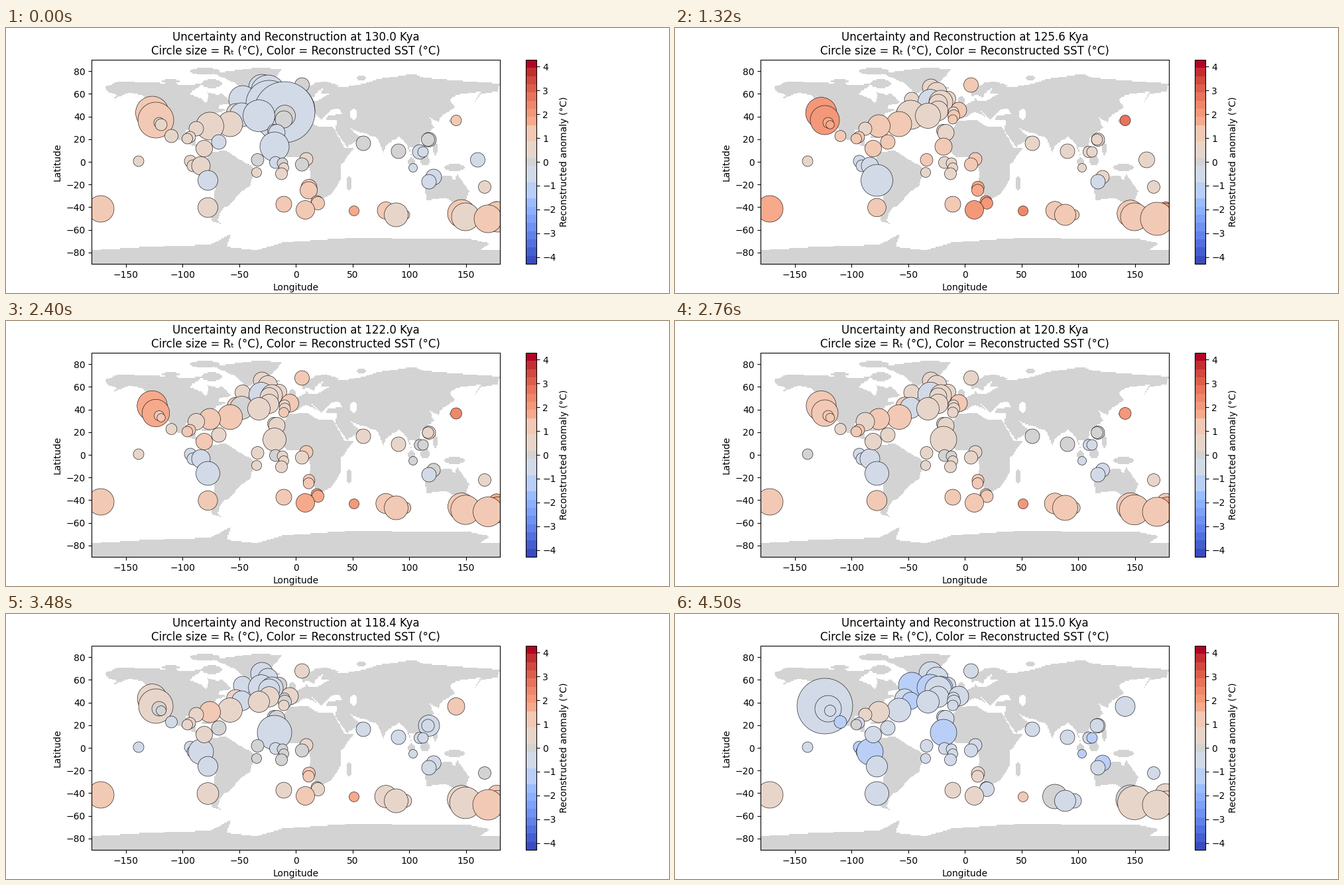
A matplotlib script that plays this animation: 1000x400 px, repeating every 4530 ms.

```python
import numpy as np
import matplotlib.pyplot as plt
from matplotlib.animation import FuncAnimation
from matplotlib.cm import ScalarMappable
from matplotlib.colors import ListedColormap, Normalize, to_rgb
from matplotlib.path import Path

plt.rcParams["font.family"] = "DejaVu Sans"
V_MAX = 4.29
PX_PER_DEG = 616 / 360

# Rough coastlines as (lon, lat) corners
canada = [(-168, 66), (-156, 71), (-128, 70), (-96, 68), (-82, 69), (-87, 65),
          (-94, 60), (-82, 55), (-79, 52), (-77, 58), (-78, 62), (-70, 59),
          (-65, 60), (-56, 52), (-66, 50), (-70, 47), (-124, 47), (-136, 59),
          (-147, 61), (-162, 55), (-158, 59), (-166, 62)]
usa_mexico = [(-124, 48), (-70, 48), (-60, 46), (-70, 43), (-76, 36), (-81, 31),
              (-80, 25), (-84, 30), (-97, 28), (-98, 22), (-95, 18.5), (-88, 21),
              (-88, 16), (-83, 15), (-77, 8), (-82, 8), (-88, 13), (-105, 20),
              (-113, 31), (-117, 33), (-124, 40)]
south_america = [(-77, 8), (-62, 10.5), (-51, 3), (-35, -6), (-41, -22), (-48, -26),
                 (-57, -37), (-65, -42), (-69, -51), (-66, -55), (-74, -52),
                 (-71, -19), (-81, -5), (-79, 2)]
europe_north = [(8, 53), (10, 57), (11, 54), (20, 54.5), (30, 60), (22, 60.5),
                (25, 65.5), (18, 61), (16, 56), (11, 59), (6, 58), (5, 62),
                (18, 70), (26, 71), (40, 67), (34, 66), (44, 66), (60, 69), (60, 53)]
europe_south = [(8, 54), (60, 54), (60, 25.5), (51, 28), (48, 30), (54, 24), (59, 22),
                (45, 13), (35, 28), (36, 36.5), (27, 37), (28, 41), (41, 42),
                (38, 47), (31, 46), (28, 42), (23, 37), (14, 45), (18, 40), (9, 44),
                (0, 39), (-9, 37), (-9, 43), (-1.5, 44), (-4, 48)]
asia = [(60, 69), (73, 73), (104, 77.5), (113, 74), (140, 72), (180, 69), (178, 62.5),
        (163, 59.5), (157, 51), (163, 62), (142, 59), (136, 55), (140, 48), (128, 40),
        (126, 35), (118, 39), (122, 30), (110, 21), (109, 12), (100, 13), (103, 2),
        (98, 15.5), (91, 22), (80, 15), (77.5, 8), (72, 21), (60, 25.5)]
africa = [(-6, 36), (10, 37), (20, 31), (33, 31), (43, 12), (51, 12), (40, -3),
          (40, -15), (32, -28), (20, -35), (12, -18), (13, -10), (9, 4), (-8, 4.5),
          (-17, 14), (-10, 30)]
australia = [(114, -22), (131, -12), (137, -12), (140, -17), (142.5, -11),
             (153, -26), (149, -38), (138, -35), (131, -31.5), (115, -34.5)]
greenland = [(-73, 78), (-32, 83.5), (-12, 81.5), (-22, 70), (-43, 60), (-54, 70)]
antarctica = [(-180, -90), (-180, -78), (-130, -75), (-75, -73), (-57, -63.5),
              (-61, -75), (-35, -78), (-10, -71), (50, -67), (155, -68.5),
              (171, -72), (163, -77.5), (180, -78), (180, -90)]
COASTS = (canada, usa_mexico, south_america, europe_north, europe_south, asia,
          africa, australia, greenland, antarctica)

# Islands as ellipses: lon, lat, half width, half height
ISLANDS = [(-74, 69, 9, 4), (-80, 80, 13, 3), (-110, 71, 8, 2), (-19, 65, 5, 1.4),
           (-3, 54, 3, 4), (47, -19, 2.3, 6), (102, 0, 3, 4), (114, 1, 4, 4.5),
           (140, -5, 9, 3), (138, 36, 3, 2.5), (172, -42, 3, 3), (123, 12, 2, 6),
           (-79, 22, 5, 1), (58, 74, 4, 2)]

# Anomaly curves (°C) at these steps
KEYS = [0, 20, 44, 68, 92, 116, 150]
north = [-.65, .3, .4, .4, .35, -.25, -.7]
subpolar = [-.5, 0, -.3, -.3, -.4, -.6, -.95]
middle = [.1, 1, 1.15, 1.05, .75, .3, -.4]
subtropic = [.65, 1.1, 1.2, 1.2, 1.05, .6, -.35]
gulf = [.6, .8, .8, .9, .7, .65, .4]
baja = [.5, .9, .9, .7, .4, -.4, -1]
west = [1, 1.8, 2, 1.9, 1.2, .3, -.5]
tropic = [.4, .5, .6, .5, .1, -.3, -.5]
east = [.4, .1, -.3, -.4, -.5, -.6, -1]
southern = [1.1, 1.5, 1.6, 1.6, 1.2, .95, .5]
indian = [1, 1.3, 1.4, 1.3, 1.1, .5, .05]
monsoon = [-.3, .4, .5, .3, -.1, -.4, -.65]
canary = [-.4, .6, .9, .9, .5, -.4, -.95]
kuroshio = [1.1, 2.5, 2.9, 2.8, 1.9, 1, -.4]
steady = [-.4] * 7

# Sites: stage x, y, radius (fixed, start/middle/end or per key), curve, offset
pacific = [
    (220.5, 128, (25, 23, 22), west, .1),
    (226, 139, (27, 40, 22, 21.5, 20, 26, 42), west),
    (231, 143, (8, 8, 8, 7, 8, 11, 20), west, -.2),
    (234, 146, (9, 5.5, 8.5), west, -.3),
    (249.5, 163, (10, 8, 9.5), baja),
    (200, 201, 8, tropic),
    (278, 201, 9, east),
    (282, 208, 9, east, .1),
    (294, 208, (14, 14, 13, 13, 15, 19, 20), east, .1),
    (304.5, 230, (15, 17, 24, 18, 18, 15, 16), steady),
    (304.5, 271, (15, 13.5, 18), subtropic),
    (143, 273, 20, southern),
]
north_atlantic = [
    (446.5, 86, 11, middle),
    (386, 90, (20, 18, 13, 13, 13, 17, 18), north),
    (395, 97, (26, 24, 15, 14, 15, 15, 17), north, -.15),
    (357, 108, (21, 12, 11, 11, 12, 14, 20), north, -.17),
    (385, 111, (20, 18, 20), subpolar),
    (412, 107, 11.5, north, .15),
    (401, 112, (26, 26, 18, 16, 16, 17, 18), north, -.17),
    (397, 114, (35, 16, 14, 14, 13, 16, 20), north, -.1),
    (397, 125, (18, 14, 16), north, .45),
    (428, 124, (38, 17, 12, 14, 13, 13, 15), middle, .15),
    (420, 127, (46, 12, 8, 8, 8, 8, 9), middle, -.3),
    (420.5, 132.5, (16, 24, 9, 8, 9, 10, 10), middle, -.25),
    (419, 138, (13, 7, 7, 7, 8, 8, 8), middle),
]
west_atlantic = [
    (346.5, 128, (14, 12, 15), subtropic),
    (355.5, 131, (18, 26, 22, 19, 16, 15, 13), monsoon, -.22),
    (338, 145, (19, 19, 18), subtropic),
    (307.5, 148, (21, 16, 16), gulf, .25),
    (287, 152, (11, 11, 10, 11, 14, 11, 10), gulf),
    (277.5, 164.5, 8.5, subtropic, .1),
    (273.5, 167, 8, subtropic, .2),
    (299, 182, 12.5, subtropic, -.2),
    (321, 172, 11, middle, -.28),
    (381.5, 132.5, (24, 19, 19, 17, 17, 16, 17), north, .45),
    (404, 155, 9.5, monsoon, .14),
    (408.5, 158, 12.5, north, .2),
    (405, 179, (22, 14, 13, 15, 20, 26, 20), canary),
]
south_atlantic = [
    (379.5, 199, 9.5, middle, -.24),
    (378, 218, 7.5, tropic, .15),
    (406.5, 203, 9, monsoon),
    (417, 204, 8, monsoon, .24),
    (419, 211, 7.5, tropic, .15),
    (415.5, 220, 9, tropic, .15),
    (453, 198, 10, subtropic, -.2),
    (446.5, 206, 10, middle, -.15),
    (419, 266, 12, southern, -.22),
    (457, 240.5, (12, 8.5, 10), southern, .1),
    (456.5, 245, (13, 8, 9), southern, .1),
    (469, 262, 9, west, .2),
    (470.5, 264.5, (10, 8.5, 11), west),
    (451.5, 274.5, 14, southern, .33),
]
indo_pacific = [
    (525, 276, 7.5, southern, .7),
    (539, 174, 11, monsoon, .14),
    (592, 186, 11, monsoon, .14),
    (638, 168.5, (11, 9, 10, 10, 10, 16, 11), monsoon, .14),
    (636.5, 168.5, (10, 8, 10.5), monsoon, .14),
    (624, 187, (11, 8, 9), monsoon, -.1),
    (629, 187, 8, monsoon, -.22),
    (614, 211, 6.5, monsoon, -.25),
    (645, 225, (12, 9.5, 12), monsoon, -.25),
    (638, 232, 11, steady),
    (711.5, 199, (11, 12, 12, 14, np.nan, np.nan, np.nan), monsoon),
    (722, 240, 9.5, tropic, .15),
    (679, 139.5, (8, 7, 8, 8, 9, 13, 15), kuroshio),
]
southern_ocean = [
    (602, 282, (7, 8, 11), indian, -.25),
    (573, 275.5, (13, 14, 18.5), indian),
    (588.5, 282, (18, 15, 16, 17, 19, 18, 16), indian, -.23),
    (687, 280, (21, 20, 22), indian),
    (693, 285, (21, 21, 25.5), gulf, .17),
    (740, 272, (10, 9.5, 16), indian, .4),
    (742, 285, (23, 20, 18), southern, .35),
    (727, 288, (21, 24, 25, 23, 22, 23, 22), southern, -.08),
]
SITES = (pacific + north_atlantic + west_atlantic + south_atlantic
         + indo_pacific + southern_ocean)


def land_mask():
    lon, lat = np.meshgrid(np.arange(-179.5, 180), np.arange(-89.5, 90))
    cells = np.column_stack([lon.ravel(), lat.ravel()])
    mask = np.zeros(lon.shape, bool)
    for coast in COASTS:
        mask |= Path(coast).contains_points(cells).reshape(lon.shape)

    def ellipse(x, y, rx, ry):
        return ((lon - x) / rx) ** 2 + ((lat - y) / ry) ** 2 < 1

    for island in ISLANDS:
        mask |= ellipse(*island)
    caspian = ellipse(51, 42, 3, 5)
    return mask & ~caspian


def banded_coolwarm():
    colors = plt.get_cmap("coolwarm")(np.linspace(0, 1, 25))
    colors[8:10, :3] = to_rgb("#b9cff8")
    colors[10:12, :3] = to_rgb("#d2dae8")
    colors[12, :3] = to_rgb("lightgray")
    colors[13:15, :3] = to_rgb("#e8d5ca")
    colors[15:17, :3] = to_rgb("#f1c9b4")
    return ListedColormap(colors)


def radius_at(radius, step):
    if np.isscalar(radius):
        return radius
    keys = KEYS if len(radius) == len(KEYS) else (0, 56, 150)
    return np.interp(step, keys, radius)


def anomaly_at(step, curve, offset=0):
    return np.interp(step, KEYS, curve) + offset


cmap, norm = banded_coolwarm(), Normalize(-V_MAX, V_MAX)
fig = plt.figure(figsize=(10, 4), dpi=100)
ax = fig.add_axes([.1292, .11, .616, .77])
ax.imshow(np.ma.masked_equal(land_mask(), False), extent=(-180, 180, -90, 90),
          origin="lower", cmap=ListedColormap(["lightgray"]),
          interpolation="nearest", aspect="auto")
ax.set(xlim=(-180, 180), ylim=(-90, 90), xlabel="Longitude", ylabel="Latitude",
       xticks=range(-150, 151, 50), yticks=range(-80, 81, 20))
title = ax.set_title("")

x, y = np.array([site[:2] for site in SITES]).T
circles = ax.scatter((x - 437.2) / PX_PER_DEG, (202 - y) / PX_PER_DEG,
                     c=np.zeros(len(SITES)), cmap=cmap, norm=norm,
                     edgecolors="black", linewidths=.4, zorder=2)

cax = fig.add_axes([.7842, .11, .0154, .77])
bar = fig.colorbar(ScalarMappable(norm, cmap), cax=cax, ticks=range(-4, 5))
bar.set_label("Reconstructed anomaly (°C)")


def update(step):
    radii = np.array([radius_at(site[2], step) for site in SITES])
    circles.set_sizes((2 * np.nan_to_num(radii) * 72 / fig.dpi) ** 2)
    circles.set_array(np.array([anomaly_at(step, *site[3:]) for site in SITES]))
    circles.set_alpha(np.where(np.isnan(radii), 0.0, 1.0))
    title.set_text(f"Uncertainty and Reconstruction at {130 - step / 10:.1f} Kya\n"
                   "Circle size = Rₜ (°C), Color = Reconstructed SST (°C)")
    return circles, title


anim = FuncAnimation(fig, update, frames=151, interval=30, repeat=True,
                     repeat_delay=0, blit=False)
plt.show()
```
